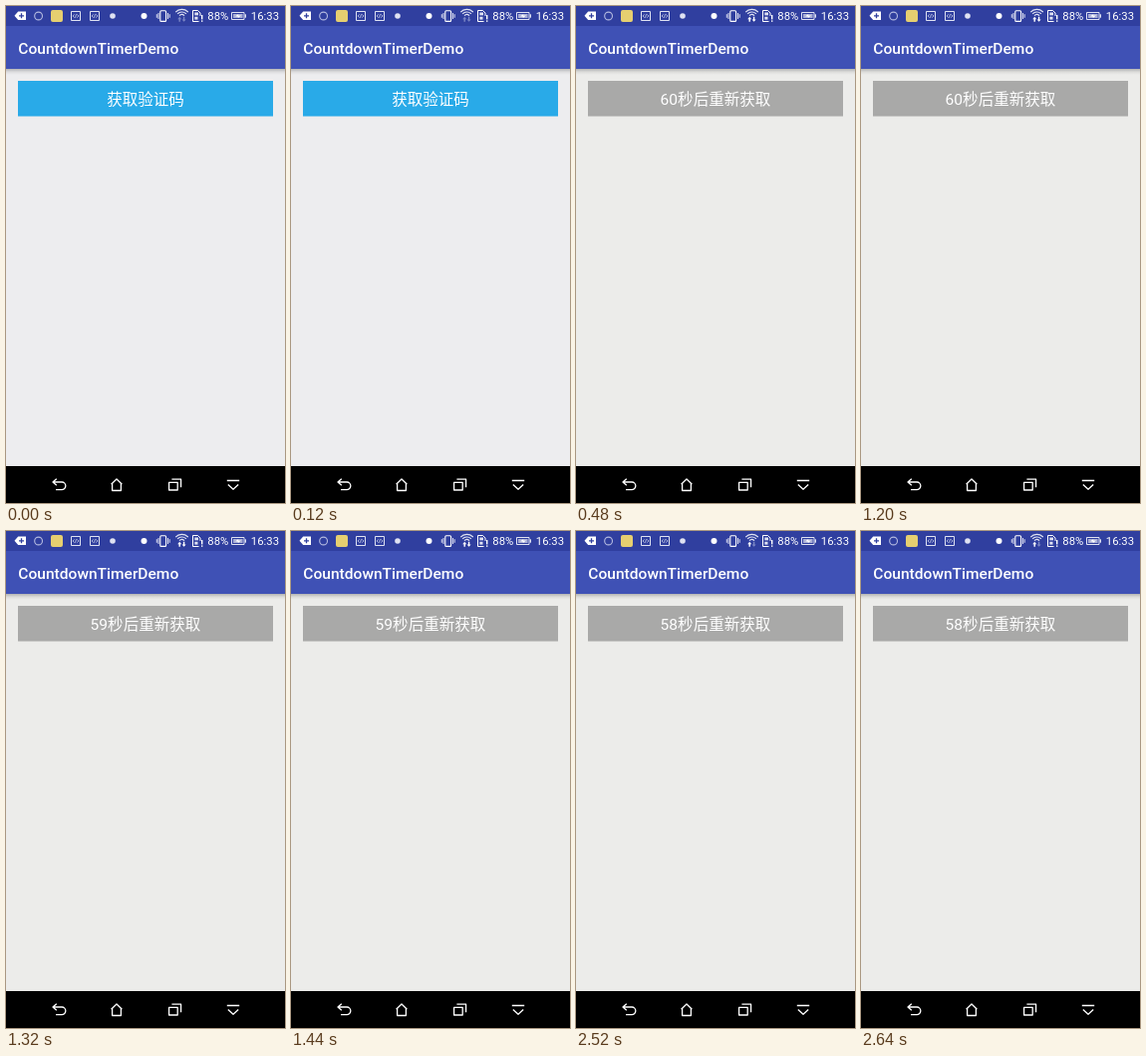
An HTML page with a canvas that plays this animation: 280 px wide and 498 px high, repeating every 2760 ms.

```html
<!DOCTYPE html>
<html lang="zh">
<head>
<meta charset="utf-8">
<title>CountdownTimerDemo</title>
<style>
  html, body { margin: 0; width: 100%; height: 100%; overflow: hidden; background: #000; }
  canvas { display: block; width: 280px; height: 498px; }
</style>
</head>
<body>
<canvas id="stage"></canvas>
<script>
const W = 280, H = 498, LOOP = 2760;
const FONT = 'Roboto, "Noto Sans CJK SC", "Noto Sans CJK", sans-serif';
const WHITE = '#fff', SOFT = '#dfe2f2', DIM = '#7b86c4';
const STATUS = '#303f9f', BAR = '#3f51b5';

const canvas = document.getElementById('stage');
const ctx = canvas.getContext('2d');
const ratio = window.devicePixelRatio || 1;
canvas.width = W * ratio;
canvas.height = H * ratio;

// Each entry holds from its start time until the next one.
const labels = [
  [0, '获取验证码'],
  [240, '60秒后重新获取'],
  [1320, '59秒后重新获取'],
  [2520, '58秒后重新获取']
];
const pages = [[0, '#ededef'], [240, '#edecec'], [480, '#ececea']];
const arrows = [[0, [DIM, DIM]], [480, [WHITE, WHITE]], [2400, [WHITE, DIM]]];

function at(track, t) {
  let value = track[0][1];
  for (const [start, v] of track) if (t >= start) value = v;
  return value;
}

function rect(x, y, w, h, color) {
  ctx.fillStyle = color;
  ctx.fillRect(x, y, w, h);
}

function shape(d, color) {
  ctx.fillStyle = color;
  ctx.fill(new Path2D(d));
}

function line(d, color = WHITE, width = 1) {
  ctx.strokeStyle = color;
  ctx.lineWidth = width;
  ctx.stroke(new Path2D(d));
}

function dot(x, y, r, color) {
  ctx.fillStyle = color;
  ctx.beginPath();
  ctx.arc(x, y, r, 0, Math.PI * 2);
  ctx.fill();
}

function text(str, x, y, size, { weight = 400, align = 'left', color = WHITE } = {}) {
  ctx.font = `${weight} ${size}px ${FONT}`;
  ctx.textAlign = align;
  ctx.fillStyle = color;
  ctx.fillText(str, x, y);
}

function codeBox(x) {
  line(`M${x + .5} 5.5h9v9h-9z`, SOFT);
  line(`M${x + 3.6} 8.4l-1.6 1.6l1.6 1.6M${x + 6.4} 8.4l1.6 1.6l-1.6 1.6M${x + 5.5} 8.2l-1 3.6`, SOFT, .7);
}

function wifi(colors) {
  for (const [r, color] of [[8.6, SOFT], [6, SOFT], [3.4, SOFT]]) {
    ctx.beginPath();
    ctx.arc(176.5, 12, r, -Math.PI * .76, -Math.PI * .24);
    ctx.strokeStyle = color;
    ctx.lineWidth = 1.2;
    ctx.stroke();
  }
  shape('M174.2 10.8l2 2.4h-1.3v2.6h-1.4v-2.6h-1.3z', colors[0]);
  shape('M178.6 15.8l2-2.4h-1.3v-2.6h-1.4v2.6h-1.3z', colors[1]);
}

function statusBar(t) {
  rect(0, 0, W, 20, STATUS);

  shape('M8.5 9.8L12.2 5.5H20V14H12.2z', WHITE);
  line('M15.5 7.3v5M13 9.8h5', STATUS, 1.3);

  ctx.beginPath();
  ctx.arc(32.6, 10, 3.9, 0, Math.PI * 2);
  ctx.strokeStyle = '#b4bae0';
  ctx.lineWidth = 1.1;
  ctx.stroke();

  ctx.fillStyle = '#e6cf70';
  ctx.beginPath();
  ctx.roundRect(45, 4, 12, 12, 2);
  ctx.fill();

  codeBox(65);
  codeBox(84);
  dot(107, 10, 2.8, SOFT);
  dot(138.5, 10, 3, WHITE);

  // Vibrate
  ctx.strokeStyle = WHITE;
  ctx.lineWidth = 1.1;
  ctx.beginPath();
  ctx.roundRect(154.8, 4.8, 5.8, 10.6, 1);
  ctx.stroke();
  line('M153 7v6M162.5 7v6M151.3 8.2v3.6M164.2 8.2v3.6', SOFT);

  wifi(at(arrows, t));

  // Card with warning
  line('M187.5 4.5h5l2.5 2.5v3M187.5 4.5v11h6', WHITE);
  rect(189.3, 6.5, 3.7, 2.8, SOFT);
  rect(189.3, 10.8, 3.2, 2.8, SOFT);
  rect(196, 9, 1.4, 4.4, WHITE);
  rect(196, 14.4, 1.4, 1.4, WHITE);

  text('88%', 202.3, 14.1, 11.3);

  // Battery
  line('M226.5 6.5h12.5v7h-12.5z', SOFT);
  rect(239.6, 8.3, 1.4, 3.4, SOFT);
  rect(228, 8, 9.6, 4, '#a9afd6');
  shape('M230 10.3l3.2-2v1.1h2.8l-3.2 2.5v-1.2z', WHITE);

  text('16:33', 274, 14.1, 11.3, { align: 'right' });
}

function navBar() {
  rect(0, 461, W, 37, '#000');
  ctx.lineJoin = 'round';
  line('M50.8 473.8l-3.8 3.2l3.8 3.2M47.3 477H56a3.7 3.7 0 0 1 0 7.7h-6', WHITE, 1.3);
  line('M105.6 479.2l5.4-5.2l5.4 5.2M106.6 478.6v6.9h8.8v-6.9', WHITE, 1.3);
  line('M163.6 477.4h8.6v7.6h-8.6zM166.4 474.2h9.2v8', WHITE, 1.3);
  line('M221.8 475.5h12.4M222.8 479.4l5.2 4.8l5.2-4.8', WHITE, 1.3);
  ctx.lineJoin = 'miter';
}

function draw(t) {
  ctx.setTransform(ratio, 0, 0, ratio, 0, 0);
  rect(0, 0, W, H, at(pages, t));

  const shade = ctx.createLinearGradient(0, 63, 0, 69);
  shade.addColorStop(0, 'rgba(0,0,0,.24)');
  shade.addColorStop(.5, 'rgba(0,0,0,.07)');
  shade.addColorStop(1, 'rgba(0,0,0,0)');
  rect(0, 63, W, 6, shade);
  rect(0, 20, W, 43, BAR);
  statusBar(t);
  text('CountdownTimerDemo', 12.3, 47.5, 15.56, { weight: 500 });

  rect(12, 75, 256, 35.5, t < 240 ? '#29aae8' : '#a9a9a8');
  text(at(labels, t), 140, 99.2, 15.56, { align: 'center' });
  navBar();
}

function tick() {
  draw(performance.now() % LOOP);
  requestAnimationFrame(tick);
}
tick();
</script>
</body>
</html>
```
